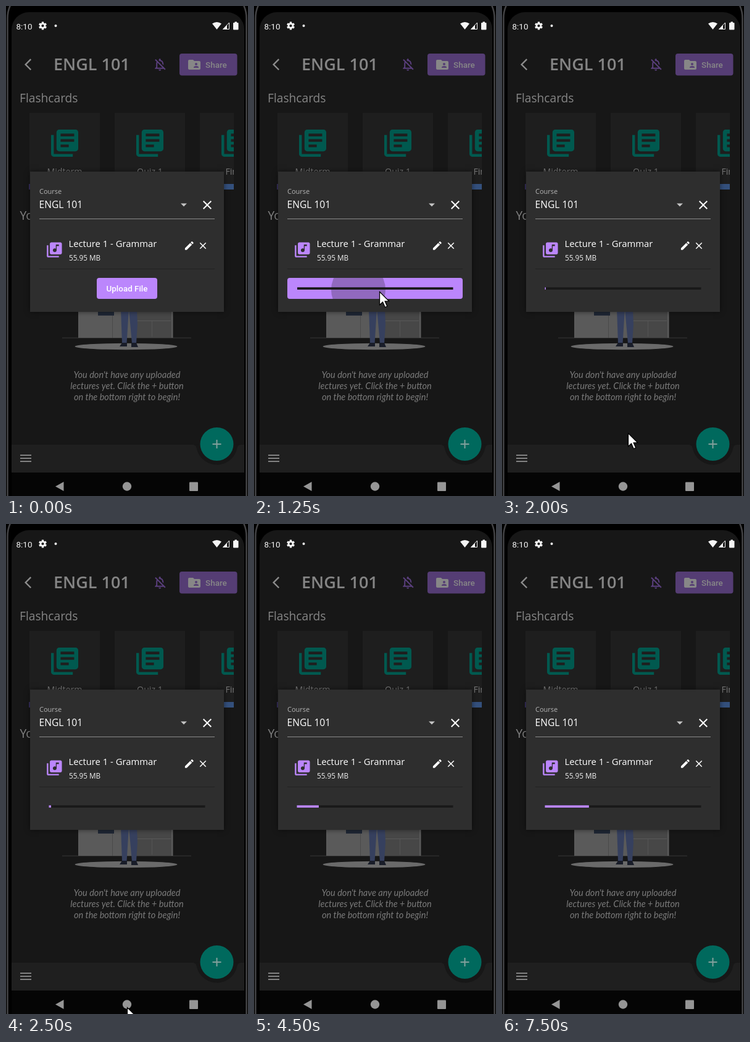
An HTML page with a canvas for the animation above (8 s loop, 392 by 793 pixels).

```html
<!DOCTYPE html>
<html lang="en">
<head>
<meta charset="utf-8">
<title>Lecture upload</title>
<style>
html, body { margin: 0; width: 100%; height: 100%; overflow: hidden; background: #000; }
canvas { display: block; width: 392px; height: 793px; }
</style>
</head>
<body>
<canvas id="stage"></canvas>
<script>
const W = 392, H = 793, LOOP = 8000;
const canvas = document.getElementById('stage');
const dpr = window.devicePixelRatio || 1;
canvas.width = W * dpr;
canvas.height = H * dpr;
const ctx = canvas.getContext('2d');

const SANS = '"Open Sans", sans-serif', LATO = 'Lato, sans-serif', ROBOTO = 'Roboto, sans-serif';
const PURPLE = '#bb86fc';

// Icons on a 24 unit grid
const ICONS = {
  books: 'M4 6H2v14c0 1.1.9 2 2 2h14v-2H4V6zm16-4H8c-1.1 0-2 .9-2 2v12c0 1.1.9 2 2 2h12c1.1 0 2-.9 2-2V4c0-1.1-.9-2-2-2zm-1 9H9V9h10v2zm-4 4H9v-2h6v2zm4-8H9V5h10v2z',
  music: 'M20 2H8c-1.1 0-2 .9-2 2v12c0 1.1.9 2 2 2h12c1.1 0 2-.9 2-2V4c0-1.1-.9-2-2-2zm-2 5h-3v5.5c0 1.38-1.12 2.5-2.5 2.5S10 13.88 10 12.5s1.12-2.5 2.5-2.5c.57 0 1.08.19 1.5.51V5h4v2zM4 6H2v14c0 1.1.9 2 2 2h14v-2H4V6z',
  edit: 'M3 17.25V21h3.75L17.81 9.94l-3.75-3.75L3 17.25zM20.71 7.04c.39-.39.39-1.02 0-1.41l-2.34-2.34c-.39-.39-1.02-.39-1.41 0l-1.83 1.83 3.75 3.75 1.83-1.83z',
  close: 'M19 6.41L17.59 5 12 10.59 6.41 5 5 6.41 10.59 12 5 17.59 6.41 19 12 13.41 17.59 19 19 17.59 13.41 12z',
  drop: 'M7 10l5 5 5-5z',
  back: 'M11.67 3.87L9.9 2.1 0 12l9.9 9.9 1.77-1.77L3.54 12z',
  bellOff: 'M12 22c1.1 0 2-.9 2-2h-4c0 1.1.9 2 2 2zm0-15.5c2.49 0 4 2.02 4 4.5v.1l2 2V11c0-3.07-1.63-5.64-4.5-6.32V4c0-.83-.67-1.5-1.5-1.5s-1.5.67-1.5 1.5v.68c-.24.06-.47.15-.69.23l1.64 1.64c.18-.02.36-.05.55-.05zM5.41 3.35L4 4.76l2.81 2.81C6.29 8.57 6 9.74 6 11v5l-2 2v1h14.24l1.74 1.74 1.41-1.41L5.41 3.35zM16 17H8v-6c0-.68.12-1.32.34-1.9L16 16.76V17z',
  folder: 'M20 6h-8l-2-2H4c-1.1 0-1.99.9-1.99 2L2 18c0 1.1.9 2 2 2h16c1.1 0 2-.9 2-2V8c0-1.1-.9-2-2-2zm-5 3c1.1 0 2 .9 2 2s-.9 2-2 2-2-.9-2-2 .9-2 2-2zm4 8h-8v-1c0-1.33 2.67-2 4-2s4 .67 4 2v1z',
  menu: 'M3 18h18v-2H3v2zm0-5h18v-2H3v2zm0-7v2h18V6H3z'
};
for (const name in ICONS) ICONS[name] = new Path2D(ICONS[name]);

// [start ms, x, y]; the pointer jumps from place to place
const POINTER = [
  [250, 199, 610], [500, 205, 512], [750, 208, 463], [1000, 203, 462],
  [1750, 217, 612], [2000, 204, 691], [2250, 196, 761], [2500, 196, 782],
  [2750, 214, 770], [3000, 0, 900]
];
// [start ms, filled share of the bar]
const PROGRESS = [[2000, .006], [2500, .014], [2750, .03], [3500, .07], [4500, .14], [6750, .282]];

const latest = (steps, t) => steps.filter(s => s[0] <= t).pop();

function rect(x, y, w, h, color, r = 0) {
  ctx.fillStyle = color;
  ctx.beginPath();
  ctx.roundRect(x, y, w, h, r);
  ctx.fill();
}

function ellipse(x, y, rx, ry, color) {
  ctx.fillStyle = color;
  ctx.beginPath();
  ctx.ellipse(x, y, rx, ry, 0, 0, Math.PI * 2);
  ctx.fill();
}

const disc = (x, y, r, color) => ellipse(x, y, r, r, color);

function poly(points, color) {
  ctx.fillStyle = color;
  ctx.beginPath();
  points.forEach(([x, y]) => ctx.lineTo(x, y));
  ctx.closePath();
  ctx.fill();
}

function text(str, x, y, font, color, align = 'left') {
  ctx.font = font;
  ctx.fillStyle = color;
  ctx.textAlign = align;
  ctx.fillText(str, x, y);
}

function icon(name, x, y, scale, color) {
  ctx.save();
  ctx.translate(x, y);
  ctx.scale(scale, scale);
  ctx.fillStyle = color;
  ctx.fill(ICONS[name]);
  ctx.restore();
}

function drawPhone() {
  rect(0, 0, W, H, '#000');
  ctx.strokeStyle = '#444446';
  ctx.lineWidth = 2.5;
  ctx.beginPath();
  ctx.roundRect(2.5, -30, 387, 900, 50);
  ctx.stroke();
  rect(9, 10, 377, 800, '#171717', 28);
}

function drawStatusBar() {
  const white = '#f4f4f4';
  text('8:10', 16.5, 37.5, `13.5px ${ROBOTO}`, white);
  ctx.save();
  ctx.translate(59.5, 32);
  for (let i = 0; i < 6; i++) {
    ctx.rotate(Math.PI / 3);
    rect(-1.7, -6.5, 3.4, 4, white, .5);
  }
  ctx.restore();
  disc(59.5, 32, 4.8, white);
  disc(59.5, 32, 2.1, '#171717');
  disc(80.5, 32, 2, white);

  ctx.fillStyle = white;
  ctx.beginPath();
  ctx.moveTo(341.5, 38);
  ctx.lineTo(334, 28.5);
  ctx.quadraticCurveTo(341.5, 23.5, 349, 28.5);
  ctx.fill();
  ctx.strokeStyle = white;
  ctx.lineWidth = 1;
  ctx.beginPath();
  ctx.moveTo(351.5, 37.5);
  ctx.lineTo(361.5, 37.5);
  ctx.lineTo(361.5, 27);
  ctx.closePath();
  ctx.stroke();
  poly([[351, 38], [358, 38], [358, 30.5]], white);
  rect(368, 27, 8.5, 11.5, white, 1);
  rect(370.5, 25.5, 3.5, 2, white);
}

function drawHeader() {
  icon('back', 30, 83.3, .95, '#8c8c8c');
  text('ENGL 101', 77, 104, `600 27px ${SANS}`, '#858585');
  icon('bellOff', 237.2, 82.7, 1, '#5a3f7d');
  rect(281, 77, 93.5, 35.5, '#553d74', 4);
  icon('folder', 293, 83, 1, '#878787');
  text('Share', 323, 99.7, `500 13.5px ${ROBOTO}`, '#878787');
}

function drawCards() {
  text('Flashcards', 22, 156, `19.2px ${SANS}`, '#858585');
  ctx.save();
  ctx.beginPath();
  ctx.rect(30, 165, 339, 140);
  ctx.clip();
  ['Midterm', 'Quiz 1', 'Final'].forEach((label, i) => {
    const x = 38 + i * 138;
    rect(x, 173, 114, 124, '#1e1e1e');
    icon('books', x + 30.6, 195.6, 2.2, '#00594f');
    text(label, x + 57, 273, `14.2px ${SANS}`, '#777', 'center');
    rect(x - 1, 288, 116, 9, i < 2 ? '#3a3060' : '#34507c');
  });
  ctx.restore();
  text('Your Lectures', 22.5, 346, `19.2px ${SANS}`, '#858585');
}

function drawIllustration() {
  ellipse(194.5, 551, 83, 5.2, '#6a6a6a');
  rect(91, 536.5, 209, 1.2, '#303030');
  rect(117, 490, 88, 47, '#5a5a5a');
  rect(149, 490, 26, 11, '#1f2735');
  rect(172, 501, 1, 36, '#4a4a4a');
  rect(205, 490, 65, 47, '#474747');
  rect(208, 509, 59, 1, '#595959');
  rect(236, 510, 1, 25, '#555');
  rect(268, 490, 2.5, 47, '#5a5a5a');
  const denim = '#36405e', shoe = '#191d29';
  poly([[186, 490], [199, 490], [195.5, 546], [188, 546]], denim);
  poly([[199, 490], [212, 490], [213, 515], [211, 546], [204, 546]], denim);
  poly([[188, 545], [196, 545], [196, 551], [184, 551]], shoe);
  poly([[203, 545], [211, 545], [214, 552], [203, 552]], shoe);
  ["You don't have any uploaded", 'lectures yet. Click the + button', 'on the bottom right to begin!']
    .forEach((line, i) => text(line, 196, 601.5 + i * 18, `italic 14.5px ${LATO}`, '#7a7a7a', 'center'));
}

function drawBottomBars() {
  rect(9, 710, 377, 45, '#1f1f1f');
  ctx.fillStyle = '#171717';
  ctx.beginPath();
  ctx.moveTo(299, 709.5);
  ctx.quadraticCurveTo(307.5, 709.5, 308.5, 715);
  ctx.arc(341.5, 709, 33.5, Math.PI - .18, .18, true);
  ctx.quadraticCurveTo(375.5, 709.5, 384, 709.5);
  ctx.fill();
  icon('menu', 20, 720, 1, '#828282');
  disc(341.5, 709, 27, '#00695d');
  rect(334.5, 708, 14, 2, '#83a09c');
  rect(340.5, 702, 2, 14, '#83a09c');

  rect(9, 755, 377, 38, '#050505');
  const grey = '#959595';
  poly([[80, 777.5], [93.5, 770], [93.5, 785]], grey);
  disc(196, 777.5, 7.2, grey);
  rect(297, 770.5, 14, 14.5, grey, 1);
}

function drawDialog() {
  ctx.save();
  ctx.shadowColor = 'rgba(0,0,0,.5)';
  ctx.shadowBlur = 8 * dpr;
  rect(39, 268, 314, 227, '#2e2e2e');
  ctx.restore();
  text('Course', 54, 303.5, `11px ${SANS}`, '#b4b4b4');
  text('ENGL 101', 53.5, 327, `15.6px ${SANS}`, '#fff');
  icon('drop', 276, 309.5, 1, '#c4c4c4');
  icon('close', 314, 310, 1, '#fff');
  rect(54, 344, 284, 1, '#8b8b8b');

  icon('music', 63.7, 380, 1.22, PURPLE);
  text('Lecture 1 - Grammar', 101.5, 389.5, `14.8px ${SANS}`, '#fff');
  text('55.95 MB', 102, 411.5, `11.7px ${SANS}`, '#f0f0f0');
  icon('edit', 287.6, 378.7, .77, '#fff');
  icon('close', 310, 379, .75, '#fff');
  rect(54, 425, 284, 1, '#222');
}

function drawUpload(t) {
  if (t < 1250) {
    rect(147, 440, 98, 34, PURPLE, 4);
    text('Upload File', 196, 462, `500 13.4px ${ROBOTO}`, '#fff', 'center');
    return;
  }
  if (t < 1500) {
    rect(54, 440, 284, 34, PURPLE, 4);
    ctx.save();
    ctx.clip();
    disc(169, 459, 44, '#9169bf');
    ctx.restore();
  }
  rect(70, 455.3, 252.5, 3.6, '#191919');
  const step = latest(PROGRESS, t);
  if (step) rect(69.5, 455.3, 253 * step[1], 3.6, PURPLE);
}

function drawPointer(t) {
  const step = latest(POINTER, t);
  if (!step) return;
  ctx.save();
  ctx.translate(step[1] + .5, step[2] + .5);
  ctx.scale(1.25, 1.25);
  poly([[0, 0], [0, 17], [4, 13.2], [7, 20], [9.8, 18.8], [6.9, 12.2], [12, 12]], '#fff');
  ctx.strokeStyle = '#000';
  ctx.lineWidth = 1;
  ctx.stroke();
  ctx.restore();
}

function draw(t) {
  ctx.setTransform(dpr, 0, 0, dpr, 0, 0);
  drawPhone();
  drawStatusBar();
  drawHeader();
  drawCards();
  drawIllustration();
  drawBottomBars();
  drawDialog();
  drawUpload(t);
  drawPointer(t);
}

const start = performance.now();
function tick() {
  draw((performance.now() - start) % LOOP);
  requestAnimationFrame(tick);
}
tick();
</script>
</body>
</html>
```
